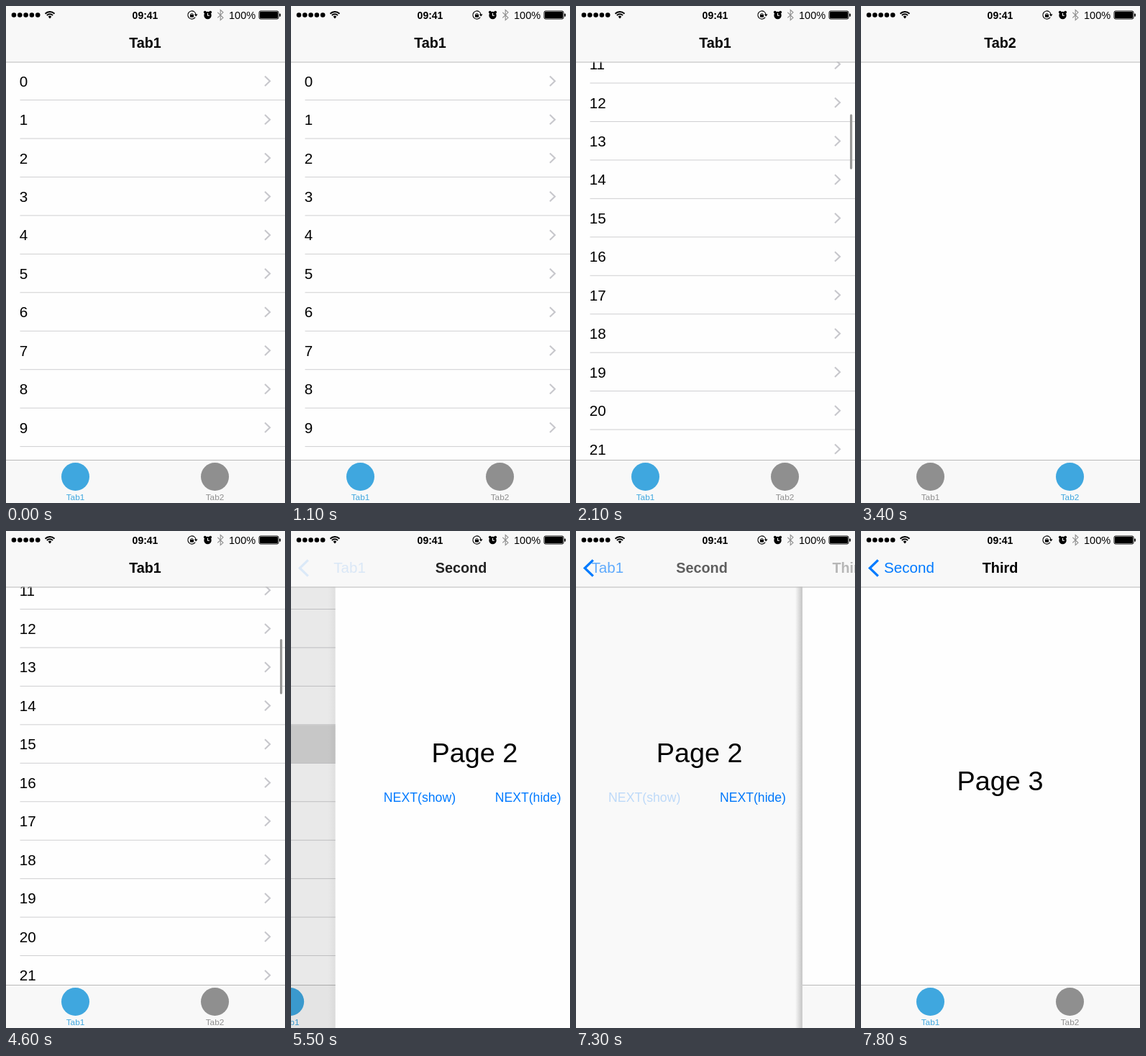
Animation of 388 by 690 pixels, one loop 8 s. Source, as an HTML page with a canvas:

```html
<!DOCTYPE html>
<html lang="en">
<head>
<meta charset="utf-8">
<title>Tab navigation</title>
<style>
  html, body { margin: 0; width: 100%; height: 100%; overflow: hidden; background: #fefefe; }
  canvas { display: block; width: 388px; height: 690px; }
</style>
</head>
<body>
<canvas id="stage"></canvas>
<script>
const W = 388, H = 690, LOOP = 8000, STEP = 100;
const NAV_Y = 77.5, TAB_Y = 630, ROW_H = 53.45;
const TINT = '#007aff', ACTIVE = '#3fa7df', IDLE = '#8f8f8f', PAPER = '#fefefe', BAR = '#f8f8f8';
const FONT = '"Liberation Sans", Arial, sans-serif';

const canvas = document.getElementById('stage');
const ctx = canvas.getContext('2d');
const dpr = window.devicePixelRatio || 1;
canvas.width = W * dpr;
canvas.height = H * dpr;

const clamp = v => Math.min(1, Math.max(0, v));
const lerp = (a, b, p) => a + (b - a) * p;

// Linear interpolation through [time, value] pairs
function track(keys, t) {
  if (t <= keys[0][0]) return keys[0][1];
  for (let i = 1; i < keys.length; i++) {
    const [t0, v0] = keys[i - 1], [t1, v1] = keys[i];
    if (t <= t1) return lerp(v0, v1, (t - t0) / (t1 - t0));
  }
  return keys[keys.length - 1][1];
}

// Critically damped spring from 0 to 1
function spring(t, start) {
  const x = Math.max(0, t - start) * 0.018;
  return 1 - (1 + x) * Math.exp(-x);
}

function rect(x, y, w, h, color) {
  ctx.fillStyle = color;
  ctx.fillRect(x, y, w, h);
}

function disc(x, y, r, color) {
  ctx.fillStyle = color;
  ctx.beginPath();
  ctx.arc(x, y, r, 0, 2 * Math.PI);
  ctx.fill();
}

function pill(x, y, w, h, r, color) {
  ctx.fillStyle = color;
  ctx.beginPath();
  ctx.roundRect(x, y, w, h, r);
  ctx.fill();
}

function line(points, color, width) {
  ctx.strokeStyle = color;
  ctx.lineWidth = width;
  ctx.beginPath();
  points.forEach(([x, y]) => ctx.lineTo(x, y));
  ctx.stroke();
}

function arc(x, y, r, from, to, color, width) {
  ctx.strokeStyle = color;
  ctx.lineWidth = width;
  ctx.beginPath();
  ctx.arc(x, y, r, from, to);
  ctx.stroke();
}

function setFont(size, bold) {
  ctx.font = `${bold ? 'bold ' : ''}${size}px ${FONT}`;
}

function text(str, x, y, size, color, { bold = false, align = 'left', alpha = 1 } = {}) {
  setFont(size, bold);
  ctx.save();
  ctx.globalAlpha *= alpha;
  ctx.textAlign = align;
  ctx.fillStyle = color;
  ctx.fillText(str, x, y);
  ctx.restore();
}

function statusBar() {
  for (let i = 0; i < 5; i++) disc(11 + i * 8.3, 12.5, 3.3, '#000');

  // Wi-Fi
  const up = -Math.PI / 2;
  arc(61, 17, 9, up - 0.8, up + 0.8, '#000', 1.9);
  arc(61, 17, 5.7, up - 0.8, up + 0.8, '#000', 1.9);
  ctx.fillStyle = '#000';
  ctx.beginPath();
  ctx.moveTo(61, 17.5);
  ctx.arc(61, 17, 3.2, up - 0.8, up + 0.8);
  ctx.fill();

  text('09:41', 193.5, 17.5, 14, '#000', { bold: true, align: 'center' });

  // Orientation lock
  arc(258.5, 12.5, 5.6, 0.6, 2 * Math.PI - 0.1, '#000', 1.1);
  ctx.fillStyle = '#000';
  ctx.beginPath();
  ctx.moveTo(261.8, 11.5);
  ctx.lineTo(266.6, 11.5);
  ctx.lineTo(264.2, 14.6);
  ctx.fill();
  rect(256, 12, 5, 3.6, '#000');
  arc(258.5, 12, 1.6, Math.PI, 2 * Math.PI, '#000', 1);

  // Alarm
  disc(276.8, 8.6, 1.9, '#000');
  disc(284.2, 8.6, 1.9, '#000');
  disc(280.5, 13, 5.2, '#000');
  line([[280.5, 9.8], [280.5, 13.2], [283, 13.2]], '#fff', 1.1);

  // Bluetooth
  line([[294.3, 8.8], [302, 16.3], [298.2, 19.5], [298.2, 5.5], [302, 8.8], [294.3, 16.3]], '#8e8e8e', 1.1);

  text('100%', 310, 17.5, 14.5, '#000');
  ctx.strokeStyle = '#000';
  ctx.lineWidth = 1;
  ctx.beginPath();
  ctx.roundRect(352, 7, 27, 11, 2);
  ctx.stroke();
  pill(353, 8, 25, 9, 1, '#000');
  pill(380.2, 10.5, 1.7, 4.2, 0.8, '#000');
}

function titleLeft(str) {
  setFont(19.8, true);
  return 193.5 - ctx.measureText(str).width / 2;
}

// q runs from the old title (0) to the new one (1)
function navBar({ oldBack = '', oldTitle = '', title, q = 1 }) {
  rect(0, 0, W, NAV_Y, BAR);
  rect(0, NAV_Y, W, 1, '#b9b9b9');
  statusBar();
  const base = 58, fade = (1 - q) ** 3, arrive = q ** 10;

  if (oldTitle) {
    const x = lerp(titleLeft(oldTitle), 32, q);
    text(oldTitle, x, base, 19.8, '#000', { bold: true, alpha: fade });
    text(oldTitle, x, base, 20.6, TINT, { alpha: arrive });
    ctx.save();
    ctx.globalAlpha = oldBack ? 1 : arrive;
    line([[23.8, 40.3], [12.2, 51.5], [23.8, 62.7]], TINT, 3.2);
    ctx.restore();
  }
  if (oldBack) text(oldBack, 32 - 71 * q, base, 20.6, TINT, { alpha: fade });
  text(title, titleLeft(title) + 220 * (1 - q), base, 19.8, '#000', { bold: true, alpha: q ** 0.7 });
}

function tabBar(selected) {
  rect(0, TAB_Y, W, H - TAB_Y, BAR);
  rect(0, TAB_Y, W, 1, '#b9b9b9');
  ['Tab1', 'Tab2'].forEach((name, i) => {
    const x = 96.5 + i * 194, color = i === selected ? ACTIVE : IDLE;
    disc(x, 653.5, 19.5, color);
    text(name, x, 686, 11.8, color, { align: 'center' });
  });
}

function listPage(scroll, barAlpha, pressedRow) {
  rect(0, 0, W, H, PAPER);
  const first = Math.floor(scroll / ROW_H);
  for (let n = first; n < first + 12; n++) {
    const top = NAV_Y + n * ROW_H - scroll, mid = top + 26.7;
    if (n === pressedRow) rect(0, top, W, ROW_H, '#d9d9d9');
    text(String(n), 18.7, mid + 7.4, 20.6, '#000');
    line([[360, mid - 6.7], [367, mid], [360, mid + 6.7]], '#c7c7cc', 2.1);
    rect(19.5, top + ROW_H - 0.9, W, 1, '#cfcfd1');
  }
  if (barAlpha > 0) {
    ctx.save();
    ctx.globalAlpha = barAlpha;
    pill(381, 81.7 + scroll * 0.112, 3.2, 76.5, 1.6, '#999');
    ctx.restore();
  }
  tabBar(0);
}

function blankPage() {
  rect(0, 0, W, H, PAPER);
  tabBar(1);
}

function secondPage(pressed) {
  rect(0, 0, W, H, PAPER);
  text('Page 2', 193.5, 320.5, 37.8, '#000', { align: 'center' });
  text('NEXT(show)', 67, 376, 17.7, TINT, { alpha: pressed ? 0.24 : 1 });
  text('NEXT(hide)', 222, 376, 17.6, TINT);
}

function thirdPage() {
  rect(0, 0, W, H, PAPER);
  text('Page 3', 193.5, 359.5, 37.8, '#000', { align: 'center' });
  tabBar(0);
}

function shifted(x, draw) {
  ctx.save();
  ctx.translate(x, 0);
  draw();
  ctx.restore();
}

// Slides a page in over the one below, which drifts left and darkens
function push(below, above, p, nav) {
  const x = W * (1 - p);
  shifted(-0.3 * W * p, below);
  rect(0, 0, x, H, `rgba(0,0,0,${0.1 * p})`);
  const shade = ctx.createLinearGradient(x - 10, 0, x, 0);
  shade.addColorStop(0, 'rgba(0,0,0,0)');
  shade.addColorStop(1, `rgba(0,0,0,${0.27 * (1 - p)})`);
  rect(x - 10, 0, 10, H, shade);
  shifted(x, above);
  navBar({ ...nav, q: clamp(p - 0.27 * p * (1 - p)) });
}

const SCROLL = [
  [1400, 0], [1500, 22], [1600, 150], [1700, 297.5], [1800, 425], [1900, 518], [2000, 578],
  [2100, 611.5], [2200, 611.5], [2300, 613], [4200, 613], [4600, 610]
];
const INDICATOR = [[1400, 0], [1500, 1], [2400, 1], [2700, 0], [4100, 0], [4300, 1]];

function draw(t) {
  const list = row => listPage(track(SCROLL, t), track(INDICATOR, t), row);
  if (t >= 3000 && t < 4200) {
    blankPage();
    navBar({ title: 'Tab2' });
  } else if (t < 5300) {
    list(-1);
    navBar({ title: 'Tab1' });
  } else if (t < 6000) {
    push(() => list(15), () => secondPage(false), spring(t, 5317), { oldTitle: 'Tab1', title: 'Second' });
  } else if (t < 7200) {
    secondPage(false);
    navBar({ oldTitle: 'Tab1', title: 'Second' });
  } else if (t < 7800) {
    push(() => secondPage(true), thirdPage, spring(t, 7256),
      { oldBack: 'Tab1', oldTitle: 'Second', title: 'Third' });
  } else {
    thirdPage();
    navBar({ oldTitle: 'Second', title: 'Third' });
  }
}

const begin = performance.now();
function frame() {
  const t = (performance.now() - begin) % LOOP;
  ctx.setTransform(dpr, 0, 0, dpr, 0, 0);
  draw(Math.floor(t / STEP) * STEP);
  requestAnimationFrame(frame);
}
frame();
</script>
</body>
</html>
```
